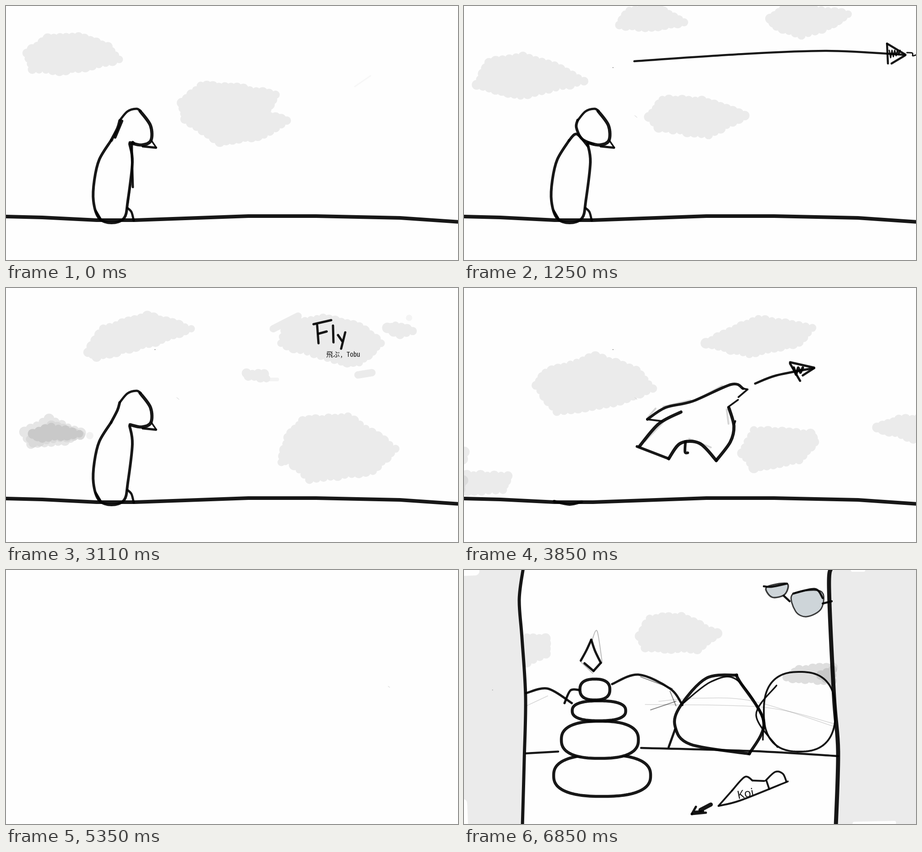
An HTML page with a canvas for the animation above (8 s loop, 998 by 561 pixels).

```html
<!DOCTYPE html>
<html lang="en">
<head>
<meta charset="utf-8">
<style>
html, body { margin: 0; width: 100%; height: 100%; overflow: hidden; background: #fefefe; }
canvas { display: block; }
</style>
</head>
<body>
<canvas id="stage" width="998" height="561"></canvas>
<script>
const ctx = document.getElementById('stage').getContext('2d');
const PAPER = '#fefefe', CLOUD = '#ebebeb';
const INK = 'rgba(0,0,0,.91)', GREY = 'rgba(0,0,0,.45)', PALE = 'rgba(0,0,0,.16)';
ctx.lineCap = ctx.lineJoin = 'round';

const points = text => text.split(' ').map(s => s.split(',').map(Number));

// Smooth curve through "x,y x,y ..."
function trace(text, closed) {
  const p = points(text), n = p.length;
  const at = i => closed ? p[(i + n) % n] : p[Math.max(0, Math.min(n - 1, i))];
  ctx.beginPath();
  ctx.moveTo(...p[0]);
  for (let i = 0; i < (closed ? n : n - 1); i++) {
    const [a, b, c, d] = [at(i - 1), at(i), at(i + 1), at(i + 2)];
    ctx.bezierCurveTo(b[0] + (c[0] - a[0]) / 6, b[1] + (c[1] - a[1]) / 6,
      c[0] - (d[0] - b[0]) / 6, c[1] - (d[1] - b[1]) / 6, ...c);
  }
  if (closed) ctx.closePath();
}

// Strokes separated by "/"
function ink(width, text, color = INK) {
  ctx.lineWidth = width;
  ctx.strokeStyle = color;
  for (const part of text.split('/')) {
    trace(part);
    ctx.stroke();
  }
}

// Polygon with seeded round bumps along its edge
function cloud(text, color = CLOUD) {
  const p = points(text);
  let seed = p[0][0] + 20;
  const rand = () => (seed = (seed * 97 + 31) % 997) / 997;
  ctx.fillStyle = color;
  ctx.beginPath();
  p.forEach(([x, y], i) => {
    const [u, v] = p[(i + 1) % p.length];
    ctx.lineTo(x, y);
    const steps = Math.ceil(Math.hypot(u - x, v - y) / 16);
    for (let k = 0; k < steps; k++) {
      const f = k / steps, r = 8 + 4 * rand();
      const bx = x + (u - x) * f, by = y + (v - y) * f;
      bumps.push([bx, by, r]);
    }
  });
  ctx.fill();
  bumps.splice(0).forEach(b => dot(...b, color));
}
const bumps = [];

function dot(x, y, r, color) {
  ctx.fillStyle = color;
  ctx.beginPath();
  ctx.arc(x, y, r, 0, 7);
  ctx.fill();
}

function scribble(x, y, step, height, turns, width) {
  ctx.lineWidth = width;
  ctx.strokeStyle = INK;
  ctx.beginPath();
  for (let i = 0; i <= turns; i++) ctx.lineTo(x + i * step, y + (i % 2) * height * (1 - i / turns / 2));
  ctx.stroke();
}

function label(text, x, y, font, angle = 0) {
  ctx.save();
  ctx.translate(x, y);
  ctx.rotate(angle);
  ctx.fillStyle = '#161616';
  ctx.font = font;
  ctx.fillText(text, 0, 0);
  ctx.restore();
}

function ground() {
  ctx.lineWidth = 8;
  ctx.strokeStyle = INK;
  ctx.beginPath();
  points('-5,465 80,467 200,473 285,473 535,464 685,464 870,468 1003,477').forEach(p => ctx.lineTo(...p));
  ctx.stroke();
}

function specks() {
  dot(329, 136, 1, '#777');
  ink(1, '377,242 382,246', '#ccc');
}

const NECK = '251,253 246,270 232,297';

function penguin() {
  ground();
  ink(6, '232,297 206,339 195,385 193,430 205,468 233,479 261,468 269,430 279,345 273,305');
  ink(5, '198,452 211,474/268,446 277,455 282,474');
  ink(7, '296,232 319,264 320,297 300,307 274,302');
  ink(5, '251,253 268,233 288,227 297,232/302,310 331,313');
  ink(3.5, '321,297 332,313');
}

function still() {
  cloud('46,104 92,72 160,68 225,90 250,118 160,138 118,143 58,140');
  cloud('388,214 430,176 510,180 595,196 570,240 620,253 570,285 472,300 395,250');
  ink(3, '770,178 805,154', '#f7f7f7');
  penguin();
  ink(6, NECK + '/256,254 241,290');
  ink(3, '242,278 235,298/275,395 270,435', GREY);
  ink(5, '283,303 278,309 280,400');
}

function flyBy() {
  cloud('-9,0 95,8 200,33 60,55 -9,52');
  cloud('241,185 265,174 330,171 336,182 255,190');
  cloud('438,317 445,277 520,265 590,237 645,250 714,290 690,310 600,319');
  cloud('699,155 717,122 815,103 968,132 905,200 815,215 715,182');
  ink(3, '-3,190 100,151 200,135 260,130', 'rgba(0,0,0,.7)');
  ink(3.5, '236,103 237,155/236,103 296,127/237,155 296,128', 'rgba(0,0,0,.75)');
  scribble(240, 121, 5, 14, 7, 2.5);
  ink(4, '312,130 322,122 330,134/330,134 340,121 346,133');
  label('FableWren', 73, 141, '30px "Noto Sans", sans-serif', -.08);
  label('flys by', 114, 177, '29px "Noto Sans", sans-serif');
  penguin();
  ink(6, NECK);
  ink(7, '272,237 255,253', GREY);
}

function passing() {
  cloud('28,174 55,125 130,111 200,132 265,166 125,198');
  cloud('343,42 365,10 430,5 486,36 400,48');
  cloud('676,28 715,0 848,18 805,45 745,65 690,45');
  cloud('408,245 438,207 525,209 620,242 540,285 430,268');
  specks();
  ink(4.5, '376,122 600,107 800,99 975,108/934,83 936,127/934,83 974,107/944,127 974,109');
  scribble(939, 98, 3, 17, 8, 3);
  ink(3, '978,103 990,104 991,110 1001,107');
  penguin();
  ink(6, '251,252 248,268 260,293 285,305/232,297 249,283 274,310');
}

function word() {
  cloud('181,142 215,90 312,62 409,90 330,118 200,152');
  cloud('607,122 620,80 700,66 780,85 828,122 780,165 740,163 620,128');
  ink(16, '590,90 645,62', CLOUD);
  cloud('842,88 860,82 898,95 870,103');
  dot(890, 66, 7, '#f4f4f4');
  ink(8, '582,202 599,202', '#f3f3f3');
  cloud('531,188 570,190 575,200 535,195');
  ink(16, '777,192 808,187', CLOUD);
  cloud('608,385 622,330 655,293 755,284 860,355 810,404 670,423 625,380');
  dot(185, 326, 8, '#f1f1f1');
  cloud('41,318 95,289 165,320 130,337 55,345', '#e6e6e6');
  cloud('52,334 100,303 164,325 60,342', '#dadada');
  cloud('59,322 100,307 162,322 80,332', '#c9c9c9');
  ink(5, '679,80 718,71/687,82 690,122/690,101 708,96/722,83 723,120/733,104 742,117/749,98 740,134');
  label('飛ぶ, Tobu', 707, 152, '15px "Noto Sans Mono CJK JP", "Noto Sans CJK JP", monospace');
  specks();
  penguin();
  ink(6, NECK);
}

function takeoff() {
  cloud('534,122 600,90 650,68 769,88 740,120 630,146');
  cloud('159,215 180,187 290,151 380,182 417,222 330,254 205,273');
  cloud('614,365 640,314 765,322 774,340 740,380 640,397');
  cloud('912,308 960,290 1005,288 1005,338');
  cloud('-9,360 1,362 -3,378');
  cloud('-9,413 97,415 86,446 -9,450');
  cloud('-9,413 -2,425 -9,445', '#dcdcdc');
  specks();
  ground();
  ink(6, '199,471 233,478 260,472');
  ink(4, '404,288 423,266/440,262 500,248/508,249 570,216/400,338 445,291/580,268 584,300/497,333 545,352', PALE);
  ink(6, '405,290 445,264 505,250 590,213 616,222/452,377 382,350/489,339 488,362 494,364');
  ink(4, '616,222 626,224/626,224 606,241/404,290 437,294/583,263 605,247/599,294 597,300');
  ink(7, '585,265 596,305 588,340 557,381/557,381 520,343 478,343 452,377/388,349 430,300 479,274');
  ink(5, '643,211 690,193 772,177/720,164 773,176/773,177 748,193/720,167 742,205');
  scribble(728, 176, 5, 17, 4, 6);
}

function blank() {
  ink(1.5, '844,257 847,259', '#ddd');
}

// Side band between a wavy frame line and the stage edge
function band(line, edge) {
  trace(line);
  ctx.lineTo(edge, 566);
  ctx.lineTo(edge, -5);
  ctx.fillStyle = CLOUD;
  ctx.fill();
}

// Rounded boulder (superellipse)
function stone(cx, cy, rx, ry, width = 6.5, fill = PAPER) {
  const bend = v => Math.sign(v) * Math.abs(v) ** .8;
  ctx.beginPath();
  for (let a = 0; a < 6.28; a += .05) ctx.lineTo(cx + rx * bend(Math.cos(a)), cy + ry * bend(Math.sin(a)));
  ctx.closePath();
  ctx.fillStyle = fill;
  ctx.fill();
  ctx.lineWidth = width;
  ctx.strokeStyle = INK;
  ctx.stroke();
}

function lantern(shape, width) {
  trace(shape, true);
  ctx.fillStyle = '#ced5d9';
  ctx.fill();
  ctx.lineWidth = width;
  ctx.strokeStyle = 'rgba(0,0,0,.75)';
  ctx.stroke();
}

function garden() {
  const left = '131,-5 122,65 128,150 136,280 133,420 129,566';
  const right = '811,-5 806,40 817,280 826,400 821,566';
  cloud('139,150 180,151 181,185 139,205');
  cloud('388,146 410,107 480,103 559,140 515,175 400,172');
  band(left, 0);
  band(right, 998);
  ink(18, '0,4 25,3/-2,515 0,561', PAPER);
  ink(8, '858,0 882,0/862,560 950,558', PAPER);
  cloud('712,237 740,220 815,215 808,245', '#dedede');
  cloud('788,232 814,220 811,245', '#c8c8c8');
  dot(63, 265, 1.2, '#bbb');

  // Sketch lines
  ink(1.5, '430,290 520,283 640,290 818,346/400,297 660,303 815,339/138,300 185,278', PALE);
  ink(2, '412,309 468,290/455,268 468,300/390,236 460,262', GREY);
  ink(2, '283,154 294,135 305,204/257,202 284,228', '#bbb');

  // Bushes and horizon
  ink(5, '137,272 185,262 238,294/222,294 235,266 254,265/327,252 385,231 455,262 482,298/466,352 452,391');
  ink(4.5, '137,405 208,401/391,393 640,400 826,411');
  ink(6.5, '602,232 535,239 478,300 466,345 500,385 630,406/602,232 608,245 662,335 630,406');
  ink(3.5, '483,295 545,247 600,241 655,315 660,375/690,255 645,320 692,391');
  stone(741, 313, 79, 88, 4, 'transparent');

  // Stone tower, bottom up
  stone(305, 454, 107, 46);
  stone(300, 375, 85, 41);
  stone(298, 311, 59, 22);
  stone(289, 264, 33, 23);
  ink(5, '281,154 270,178 258,200/281,154 289,178 302,205/302,205 286,223/286,223 266,206');

  // Hanging lanterns
  lantern('668,38 713,30 708,54 680,60', 3.5);
  lantern('726,53 788,47 789,85 757,103 732,91', 3);
  ink(4.5, '662,36 680,37 713,30/727,52 775,42 792,62/792,74 812,69/706,57 719,69');

  ink(7, left);
  ink(9, right);

  // Fish and its direction
  ink(4, '562,521 592,487/592,487 620,457 637,465/637,465 663,466/666,465 687,446 704,450 712,468/562,521 610,509 715,467/674,484 668,466');
  label('Koi', 605, 506, '25px "Noto Sans", sans-serif', -.2);
  ink(9, '545,518 522,530');
  ink(5, '503,539 512,523/503,539 534,536/510,534 528,533');
}

const scenes = [[0, still], [500, flyBy], [1250, passing], [2000, word], [3850, takeoff], [5350, blank], [6850, garden]];
let shown;

function tick(now) {
  const t = now % 8000;
  const scene = scenes.filter(s => s[0] <= t).pop()[1];
  if (scene !== shown) {
    shown = scene;
    ctx.fillStyle = PAPER;
    ctx.fillRect(0, 0, 998, 561);
    scene();
  }
  requestAnimationFrame(tick);
}
tick(0);
</script>
</body>
</html>
```
